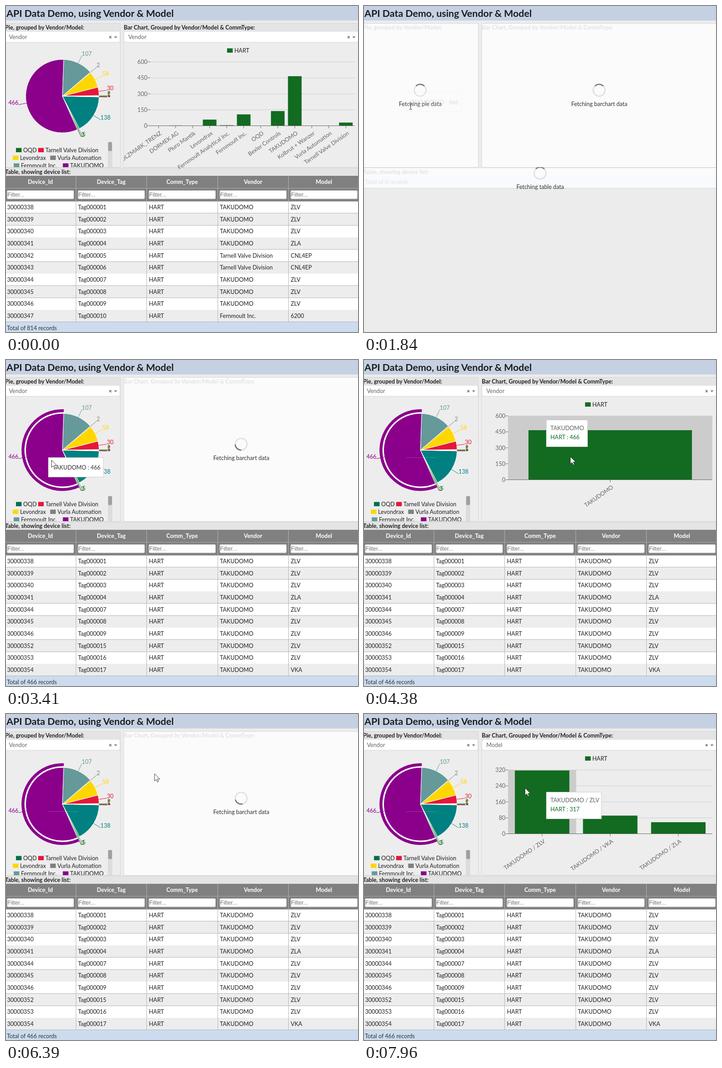
Animation of 777x720 px, one loop 8 s. Source, as an HTML page:

```html
<!DOCTYPE html>
<html lang="en">
<head>
<meta charset="utf-8">
<title>API Data Demo</title>
<style>
html, body { margin: 0; width: 100%; height: 100%; overflow: hidden; background: #ececec; }
svg { display: block; width: 777px; height: 720px; font: 12.6px Lato, sans-serif; }
text { white-space: pre; }
.b { font-weight: 700; }
.e { text-anchor: end; }
.m { text-anchor: middle; }
.arial { font-family: "Liberation Sans", Arial, sans-serif; }
.crisp { shape-rendering: crispEdges; }
</style>
</head>
<body>
<svg id="stage" viewBox="0 0 777 720"></svg>
<script>
const LOOP = 8000, INK = '#222', GREEN = '#126b20', PURPLE = '#8b008b';
const MAIN = 'TAKUDOMO', VALVE = 'Tarnell Valve Division', FERN = 'Fernmoult Inc.';
const MODELS = ['ZLV', 'VKA', 'ZLA'];

const text = (x, y, s, fill = INK, cls = '', more = '') =>
  `<text x="${x}" y="${y}" fill="${fill}" class="${cls}" ${more}>${s}</text>`;
const rect = (x, y, w, h, fill, more = '') =>
  `<rect x="${x}" y="${y}" width="${w}" height="${h}" fill="${fill}" ${more}/>`;
const line = (x1, y1, x2, y2, stroke, more = '') =>
  `<path d="M${x1} ${y1}L${x2} ${y2}" stroke="${stroke}" fill="none" ${more}/>`;
const path = (d, more) => `<path d="${d}" ${more}/>`;
const group = (id, body, more = '') => `<g id="${id}" ${more}>${body}</g>`;

// Panels and loaders
const PIE_TITLE = text(-2, 51.5, 'Pie, grouped by Vendor/Model:', INK, 'b');
const BAR_TITLE = text(260, 51.5, 'Bar Chart, Grouped by Vendor/Model &amp; CommType:', INK, 'b');
const TABLE_TITLE = text(-2, 371, 'Table, showing device list:', INK, 'b');
const panel = (x, y, w, h) => rect(x, y, w, h, '#e4e4e4', 'stroke="#d6d6d6"');
const dim = (x, y, w, h) => rect(x, y, w, h, '#fff', 'opacity=".87"');

function loader(x, y, label) {
  const c = 9.2;
  return `<circle cx="${x}" cy="${y}" r="13" fill="none" stroke="#e0e0e0" stroke-width="2.7"/>` +
    `<g transform="translate(${x} ${y})">` +
    path(`M${-c} ${-c}A13 13 0 0 1 ${c} ${-c}`, 'class="spin" fill="none" stroke="#767676" stroke-width="2.7"') +
    '</g>' + text(x + .3, y + 35, label, '#333', 'm');
}

function select(x, w, value, id) {
  const r = x + w;
  return rect(x, 56, w, 24, '#fff', 'rx="3.5" stroke="#dcdcdc"') +
    text(x + 9.5, 73, value, '#666', '', `id="${id}"`) +
    path(`M${r - 23.5} 66.5l4.6 4.8m0-4.8l-4.6 4.8`, 'stroke="#666" stroke-width="1.4"') +
    path(`M${r - 13} 67h7l-3.5 4.5z`, 'fill="#888"');
}

// Pie
const CX = 124.5, CY = 199, R = 81;
const polar = (deg, r) => {
  const a = deg * Math.PI / 180;
  return [CX + r * Math.cos(a), CY - r * Math.sin(a)];
};
const arc = (a, b, r, sweep) =>
  `A${r} ${r} 0 ${Math.abs(b - a) > 180 ? 1 : 0} ${sweep} ${polar(b, r)}`;

const SLICES = [
  [2, GREEN], [30, '#e6173a'], [58, '#ffd700'], [2, '#808080'], [107, '#669999'],
  [466, PURPLE], [3, '#222'], [5, '#1db530'], [138, '#008080'],
  [1, '#222'], [1, PURPLE], [1, '#b8860b']
];

function activeRing(from, to) {
  const inner = 83.8, outer = 90.3, gap = 82.4;
  return path(`M${polar(from, gap)}${arc(from, to, gap, 0)}`, 'fill="none" stroke="#fff" stroke-width="2.8"') +
    path(`M${polar(from, inner)}${arc(from, to, inner, 0)}L${polar(to, outer)}${arc(to, from, outer, 1)}Z`,
      `fill="${PURPLE}"`);
}

function pieBody() {
  let from = 0, wedges = '', labels = '', ring = '';
  for (const [n, color] of SLICES) {
    const to = from + n * 360 / 814, mid = (from + to) / 2;
    wedges += path(`M${CX} ${CY}L${polar(from, R)}${arc(from, to, R, 0)}Z`, `fill="${color}" stroke="#fff"`);
    const [x, y] = polar(mid, 99);
    labels += line(...polar(mid, R), x, y, color) + text(x, y, n, color, x < CX ? 'e' : '');
    if (n === 466) ring = activeRing(from, to);
    from = to;
  }
  return wedges + group('ring', ring) + labels;
}

function pieLegend() {
  const items = [
    [22, 0, 'OQD', GREEN], [71, 0, VALVE, '#e6173a'],
    [15, 1, 'Levondrax', '#ffd700'], [97.5, 1, 'Vurla Automation', '#808080'],
    [17, 2, FERN, '#669999'], [125.5, 2, MAIN, PURPLE]
  ];
  const body = items.map(([x, row, name, color], i) =>
    rect(x, 313.5 + row * 17, 12.4, 9.5, color, i ? '' : 'id="firstKey"') +
    text(x + 16, 322.5 + row * 17, name)).join('');
  return `<g clip-path="url(#pieClip)">${body}` + rect(225, 300, 9.5, 60, '#dcdcdc') +
    rect(225.5, 300.5, 8.5, 20, '#a0a0a0', 'rx="3"') + '</g>';
}

// Bar chart
const X0 = 318, X1 = 769, Y0 = 264.5, PLOT = 141;

function barChart(names, values, max) {
  const step = (X1 - X0) / names.length;
  let out = '';
  for (let i = 0; i <= 4; i++) {
    const y = Y0 - PLOT * i / 4;
    out += line(X0, y, X1, y, '#cccccc') + line(X0 - 5.5, y, X0, y, '#666') +
      text(312, y + 4.5, max * i / 4, '#666', 'e');
  }
  out += '<g class="glow"></g>';
  names.forEach((name, i) => {
    const x = X0 + step * (i + .5), h = PLOT * values[i] / max;
    out += rect(x - step * .4, Y0 - h, step * .8, h, GREEN) + line(x, Y0, x, Y0 + 5.5, '#666') +
      text(0, 0, name, '#666', 'e', `transform="translate(${x + 7.5} ${Y0 + 18.5}) rotate(-35)"`);
  });
  out += line(X0, Y0, X1, Y0, '#666');
  return `<g clip-path="url(#barClip)">${out}</g>`;
}

const VENDORS = ['DOLZMARK_TRENZ', 'DORMEK AG', 'Pluro Mantik', 'Levondrax', 'Fernmoult Analytical Inc.',
  FERN, 'OQD', 'Bexler Controls', MAIN, 'Kolbrut + Wanzer', 'Vurla Automation', VALVE];
const COUNTS = [1, 3, 1, 58, 5, 107, 2, 138, 466, 1, 2, 30];
const MODEL_COUNTS = [317, 91, 58];

// Table
function table(ids, detail, total) {
  const colX = i => -2.5 + i * 156.5;
  let out = panel(-2, 358, 790, 362) + TABLE_TITLE + rect(0, 375, 777, 56.5, '#808080');
  ['Device_Id', 'Device_Tag', 'Comm_Type', 'Vendor', 'Model'].forEach((name, i) => {
    out += text(colX(i) + 78.3, 393, name, '#fff', 'b m') +
      rect(colX(i) + 5, 407.5, 147, 18.5, '#fff', 'rx="2" stroke="#c4c4c4"') +
      text(colX(i) + 5.5, 421, 'Filter...', '#757575', 'arial');
  });
  out += line(0, 402.5, 777, 402.5, '#a8a8a8');
  ids.forEach((id, r) => {
    const y = 431.5 + r * 26.65, [vendor, model] = detail(id);
    out += rect(0, y, 777, 26.65, r % 2 ? '#ededed' : '#fff', 'class="crisp"') +
      line(0, y + 26.4, 777, y + 26.4, '#b4b4b4', 'class="crisp"');
    ['30000' + id, 'Tag' + String(id - 337).padStart(6, '0'), 'HART', vendor, model].forEach((s, i) => {
      out += text(colX(i) + 5, y + 17.6, s);
    });
  });
  for (let i = 1; i < 5; i++) out += line(colX(i), 375, colX(i), 698, '#b4b4b4', 'class="crisp"');
  return out + rect(0, 698, 777, 22, '#ccdcee') + text(2, 715.5, `Total of ${total} records`, '#333');
}
const ALL_IDS = Array.from({ length: 10 }, (_, i) => 338 + i);
const MAIN_IDS = [338, 339, 340, 341, 344, 345, 346, 352, 353, 354];
const mainDetail = id => [MAIN, id === 341 ? MODELS[2] : id === 354 ? MODELS[1] : MODELS[0]];
const allDetail = id => id === 342 || id === 343 ? [VALVE, 'CNL4EP']
  : id === 347 ? [FERN, '6200'] : mainDetail(id);

// Dropdown
const folder = (x, y) => path(`M${x} ${y}h4.5l1.3 1.6h6v7.4h-11.8z`, 'fill="#fcc21b"');
const chevron = (x, y) => path(`M${x - 4} ${y - 2}l4 4 4-4`, 'fill="none" stroke="#444" stroke-width="1.2"');
const dropdown =
  rect(260.5, 82.5, 520, 89, '#fff', 'stroke="#d0d0d0"') +
  text(267, 103, 'Search...', '#bbb') + line(268.5, 90, 268.5, 104, '#333') +
  rect(281.5, 116.5, 57.5, 15.5, '#ffecb8', 'stroke="#f6d97a"') +
  chevron(272, 125) + folder(284, 120.5) + text(298, 129, 'Vendor', '#5a5030') +
  chevron(288, 142.5) + folder(299.5, 137.5) + text(313, 146, 'Model', '#2f4a2f') +
  '<circle cx="320.5" cy="159.5" r="5.4" fill="#fff" stroke="#1d4d24"/><circle cx="320.5" cy="159.5" r="4.5" fill="#143f1b"/>' +
  text(329.5, 164, 'Revision', '#1f4a26');
const focus = rect(260.5, 56, 520, 24, 'none', 'rx="3.5" stroke="#6a1fd0" stroke-width="1.3"') +
  rect(762, 64, 12, 10, '#fff') + path('M764.5 71.5h7l-3.5-4.5z', 'fill="#777"');

const tip = (w, h) => rect(.5, .5, w, h, '#fff', 'stroke="#cccccc"');
const pieTip = tip(121.5, 43) + text(10, 27, MAIN + ' : 466', '#333');

const arrow = path('M0 0V16.2L3.8 12.7L6.4 18.4L8.9 17.3L6.4 11.8H11.6Z', 'fill="#fff" stroke="#222" stroke-width=".9"');
const beam = path('M-3 -6h2l1 1 1-1h2M0-5V5M-3 6h2l1-1 1 1h2', 'fill="none" stroke="#222"');
const hand = path('M-1.6 11.5V1Q-1.6-.6 0-.6T1.5 1V7Q3.5 5.6 4.3 7.5Q6.3 6.4 6.9 8.4Q9 7.8 9 10V13Q9 16 7 18.5H-1Q-1.5 16-5.6 11Q-5 8.6-1.6 11.5Z',
  'fill="#fff" stroke="#222"');

const stage = document.getElementById('stage');
stage.innerHTML =
  '<defs><clipPath id="pieClip"><rect y="295" width="252" height="61"/></clipPath>' +
  '<clipPath id="barClip"><rect x="260" y="81" width="517" height="285"/></clipPath></defs>' +
  rect(0, 0, 777, 720, '#ececec') + rect(0, 0, 777, 32, '#c5d1e3') +
  text(1, 23.5, 'API Data Demo, using Vendor &amp; Model', '#1b1c1d', 'b', 'style="font-size:21.45px"') +
  panel(-2, 38.5, 254.5, 318) + PIE_TITLE + panel(260, 38.5, 530, 318) + BAR_TITLE +
  group('tableAll', table(ALL_IDS, allDetail, 814)) +
  group('tableMain', table(MAIN_IDS, mainDetail, 466)) +
  group('tableLoad', panel(-2, 358, 790, 44.5) + TABLE_TITLE + rect(0, 375, 777, 27, '#ccdcee') +
    text(2, 393, 'Total of 0 records') + dim(0, 358, 777, 44) + loader(388.7, 369, 'Fetching table data')) +
  group('pie', rect(0, 81, 252, 275, '#ededed') + select(-3, 254.5, 'Vendor', 'pieValue') + pieBody() +
    group('streak', line(93, 215.5, 160, 215.5, '#fff', 'opacity=".2"')) + pieLegend()) +
  group('pieLoad', dim(0, 39, 252, 317) + loader(124, 186, 'Fetching pie data')) +
  group('bar', rect(260.5, 81, 517, 275, '#ededed') + select(260.5, 517, 'Vendor', 'barValue') +
    rect(488, 93.5, 12.5, 9.5, GREEN) + text(504, 102.5, 'HART') +
    group('barAll', barChart(VENDORS, COUNTS, 600)) +
    group('barMain', barChart([MAIN], [466], 600)) +
    group('barModels', barChart(MODELS.map(m => `${MAIN} / ${m}`), MODEL_COUNTS, 320))) +
  group('barLoad', dim(260.5, 39, 517, 317) + loader(519, 186, 'Fetching barchart data')) +
  group('focus', focus) + group('dropdown', dropdown) +
  group('pieTip', pieTip) +
  group('barTip', '<g id="tipBox"></g>' + text(9.5, 22.5, '', '#5c665c', '', 'id="tipName"') +
    text(9.5, 43, '', GREEN, '', 'id="tipCount"')) +
  group('arrow', arrow) + group('beam', beam) + group('hand', hand);

const el = id => document.getElementById(id);
const show = (id, on) => { el(id).style.display = on ? '' : 'none'; };
const move = (id, x, y) => el(id).setAttribute('transform', `translate(${x} ${y})`);
const spins = [...stage.querySelectorAll('.spin')];

// Keys are [ms, x, y]
const CURSOR = [
  [510, 654, 650], [800, 146, 383], [910, 229, 421], [1060, 229, 421], [1480, 100.5, 221],
  [3910, 100.5, 221], [4380, 455.5, 213.5], [4670, 372, 86], [4760, 372, 86], [4990, 375, 69],
  [5130, 375, 69], [5690, 333, 150], [5930, 333, 150], [6180, 327, 131], [6330, 327, 131],
  [7050, 372.5, 173.5], [7200, 372.5, 173.5], [7520, 585, 185], [7960, 355.5, 163.5]
];
const BAR_TIP = [
  [4130, 345, 140], [4380, 402, 132], [4600, 435, 140], [6700, 345, 145],
  [7050, 381, 167], [7200, 381, 167], [7580, 594, 192], [7960, 402, 172]
];

function at(keys, t) {
  const i = keys.findIndex(k => k[0] > t);
  if (i < 0) return keys[keys.length - 1].slice(1);
  if (i === 0) return keys[0].slice(1);
  const [t0, x0, y0] = keys[i - 1], [t1, x1, y1] = keys[i];
  const u = (t - t0) / (t1 - t0), k = u * u * (3 - 2 * u);
  return [x0 + (x1 - x0) * k, y0 + (y1 - y0) * k];
}

function draw(t) {
  const within = (a, b) => t >= a && t < b;
  const pieLoading = within(1630, 3350), tableLoading = within(1630, 3410);
  const barLoading = within(1630, 3510) || within(6330, 6700);
  const reloaded = t >= 3350, byModel = t >= 6330;

  show('pie', !pieLoading);
  show('pieLoad', pieLoading);
  show('ring', reloaded);
  show('streak', t >= 3990);
  el('firstKey').setAttribute('fill', reloaded ? '#00704f' : GREEN);
  show('tableAll', t < 1630);
  show('tableMain', t >= 3410);
  show('tableLoad', tableLoading);
  show('bar', !barLoading);
  show('barLoad', barLoading);
  show('barAll', t < 1630);
  show('barMain', within(3510, 6330));
  show('barModels', byModel);
  el('barValue').textContent = byModel ? 'Model' : 'Vendor';
  show('focus', within(4900, 6330));
  show('dropdown', within(5130, 6330));
  for (const s of spins) s.setAttribute('transform', `rotate(${(t - 1840) * .6})`);

  const [x, y] = at(CURSOR, t);
  const isHand = within(4880, 6330), isBeam = within(1630, 3350);
  show('arrow', t >= 510 && !isHand && !isBeam);
  show('hand', isHand);
  show('beam', isBeam);
  move('arrow', x, y);
  move('hand', x, y);
  move('beam', 103, 222.5);

  show('pieTip', within(1400, 3990));
  el('pieTip').setAttribute('opacity', pieLoading ? .14 : 1);
  move('pieTip', 93, pieLoading ? 190 : 215);

  const active = !barLoading && t >= 3910 && x > X0 && x < X1 && y > 123 && y < Y0 &&
    (within(3910, 4760) || t >= 6700);
  const count = byModel ? 3 : 1, step = (X1 - X0) / count;
  const index = Math.max(0, Math.min(count - 1, Math.floor((x - X0) / step)));
  show('barTip', active);
  for (const g of stage.querySelectorAll('#barMain .glow, #barModels .glow')) {
    g.innerHTML = active ? rect(X0 + index * step, Y0 - PLOT, step, PLOT, '#cccccc') : '';
  }
  if (active) {
    move('barTip', ...at(BAR_TIP, t));
    el('tipBox').innerHTML = tip(byModel ? 121.5 : 91, 59);
    el('tipName').textContent = byModel ? `${MAIN} / ${MODELS[index]}` : MAIN;
    el('tipCount').textContent = `HART : ${byModel ? MODEL_COUNTS[index] : 466}`;
  }
}

const start = performance.now();
function tick() {
  draw((performance.now() - start) % LOOP);
  requestAnimationFrame(tick);
}
tick();
</script>
</body>
</html>
```
